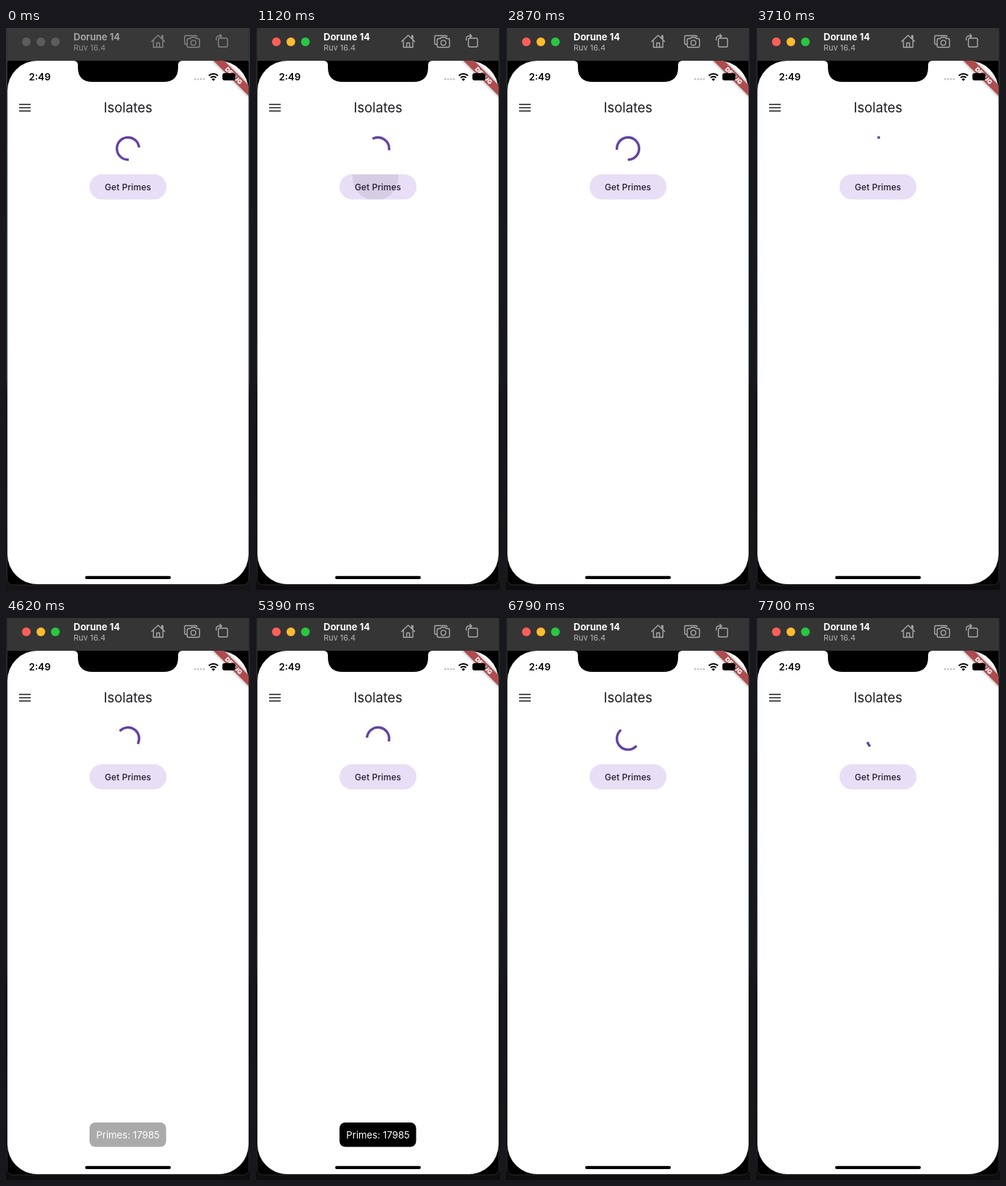
An HTML page for the animation above (7770 ms loop, 336 by 772 pixels).

```html
<!DOCTYPE html>
<html lang="en">
<head>
<meta charset="utf-8">
<title>Isolates</title>
<style>
html, body { margin: 0; width: 100%; height: 100%; overflow: hidden; background: #000; }
svg { display: block; width: 336px; height: 772px; font-family: Inter, Roboto, sans-serif; }
#bar { --bg: #353536; --title: #fff; --sub: #b4b4b4; --icon: #a9a9a9; }
#bar.idle { --bg: #383838; --title: #a3a3a3; --sub: #8f8f8f; --icon: #858585; }
#bar.idle circle { fill: #5c5c5c; }
#icons { fill: none; stroke: var(--icon); stroke-width: 1.4; stroke-linejoin: round; stroke-linecap: round; }
</style>
</head>
<body>
<svg viewBox="0 0 336 772">
  <defs>
    <linearGradient id="desk" x2="0" y2="1">
      <stop offset="0" stop-color="#27343d"/>
      <stop offset=".3" stop-color="#1f3a45"/>
      <stop offset=".62" stop-color="#2b4148"/>
      <stop offset=".66" stop-color="#14171a"/>
      <stop offset=".88" stop-color="#241d1b"/>
      <stop offset="1" stop-color="#151314"/>
    </linearGradient>
    <clipPath id="screen"><rect x="2" y="45" width="332" height="719" rx="41"/></clipPath>
    <clipPath id="pill"><rect x="115" y="201" width="106" height="34.5" rx="17.25"/></clipPath>
    <filter id="blur" x="-20%" y="-80%" width="140%" height="260%"><feGaussianBlur stdDeviation="2"/></filter>
  </defs>

  <rect width="336" height="772" fill="url(#desk)"/>
  <rect id="shade" width="336" height="772" opacity=".35"/>
  <rect x="1.5" y="40" width="333" height="725" rx="8" stroke="#3c3c3c" stroke-width=".7"/>

  <g id="bar">
    <rect x="1.5" width="333" height="45" fill="var(--bg)"/>
    <circle cx="28" cy="19" r="6" fill="#ff5f57"/>
    <circle cx="48" cy="19" r="6" fill="#febc2e"/>
    <circle cx="68" cy="19" r="6" fill="#28c840"/>
    <text x="93" y="17" font-size="13" font-weight="700" fill="var(--title)">Dorune 14</text>
    <text x="93" y="31" font-size="11" fill="var(--sub)">Ruv 16.4</text>
    <g id="icons">
      <path d="M200.500 18.500 209.500 10l9 8.500M203 17v9.500h13V17M207.500 26.500v-6h4v6M214.500 14v-3.500h1.500v5"/>
      <path d="M249 22.500h-1.500a1.500 1.500 0 0 1-1.500-1.500v-9a1.500 1.500 0 0 1 1.500-1.500h14a1.500 1.500 0 0 1 1.500 1.500"/>
      <path d="M251.500 14.500h2.500l1.200-1.700h5.600l1.200 1.700h2.500a2 2 0 0 1 2 2v8a2 2 0 0 1-2 2h-13a2 2 0 0 1-2-2v-8a2 2 0 0 1 2-2z"/>
      <ellipse cx="258" cy="20.300" rx="3.400" ry="3.400"/>
      <rect x="292.500" y="14" width="12.500" height="12" rx="1.800"/>
      <path d="M289.500 16.500v-2a3.500 3.500 0 0 1 3.500-3.500h4M294.500 8.500l2.500 2.500-2.500 2.500"/>
    </g>
  </g>

  <g clip-path="url(#screen)">
    <rect x="2" y="45" width="332" height="719" fill="#fff"/>
    <path d="M93 45q6 0 6 6v3q0 20 20 20h98q20 0 20-20v-3q0-6 6-6z"/>
    <text x="46.500" y="71.500" font-size="13.300" font-weight="600" text-anchor="middle">2:49</text>

    <path d="M18 105h16M18 109.500h16M18 114h16" stroke="#1d1b20" stroke-width="1.700"/>
    <text x="168" y="116.300" font-size="18.500" text-anchor="middle" fill="#1d1b20">Isolates</text>

    <path id="spinner" fill="none" stroke="#6442a0" stroke-width="3.400" stroke-linecap="square"/>

    <g clip-path="url(#pill)">
      <rect x="115" y="201" width="106" height="35" fill="#e8def6"/>
      <circle id="ripple" fill="#1d192b"/>
    </g>
    <text x="168" y="222.500" font-size="11.900" font-weight="500" letter-spacing=".15" text-anchor="middle" fill="#1d192b">Get Primes</text>

    <g id="toast">
      <rect x="115" y="693" width="105.500" height="33.500" rx="8"/>
      <text x="168" y="714.800" font-size="13.200" text-anchor="middle" fill="#fff">Primes: 17985</text>
    </g>
    <rect x="109" y="752.800" width="118" height="4.200" rx="2.100"/>

    <g transform="translate(334 45) rotate(45)">
      <rect x="-48" y="23.800" width="96" height="10.200" opacity=".5" filter="url(#blur)"/>
      <rect x="-48" y="23.800" width="96" height="10.200" fill="#b04a4d"/>
      <text y="32" font-size="8.500" font-weight="900" text-anchor="middle" fill="#fff">DEBUG</text>
    </g>

    <path d="M260.500 70.300h14" stroke="#b5b5b5" stroke-width="2.400" stroke-linecap="round" stroke-dasharray="0 4"/>
    <g fill="none" stroke="#000" stroke-width="2">
      <path d="M279.300 65.500a8.900 8.900 0 0 1 12.600 0M281.800 68.200a5.400 5.400 0 0 1 7.600 0"/>
    </g>
    <path d="M285.600 72.700l-2.300-2.300a3.300 3.300 0 0 1 4.600 0z"/>
    <rect x="298" y="62" width="18" height="10" rx="3"/>
    <path d="M317 65.300q1.500 1.700 0 3.400z"/>
  </g>
</svg>

<script>
const LOOP = 7770, STEP = 70;
const SPEED = 20 / 21;
const TAU = Math.PI * 2;
const el = id => document.getElementById(id);
const clamp = x => Math.min(1, Math.max(0, x));
const ramp = (t, from, length) => clamp((t - from) / length);
const fract = x => x - Math.floor(x);

// cubic-bezier(.4, 0, .2, 1)
function ease(x) {
  let lo = 0, hi = 1, s = .5;
  for (let i = 0; i < 24; i++) {
    s = (lo + hi) / 2;
    const u = 1 - s;
    if (1.2 * u * u * s + .6 * u * s * s + s ** 3 < x) lo = s; else hi = s;
  }
  return s * s * (3 - 2 * s);
}

function drawSpinner(t) {
  const time = (t - 3710) * SPEED + 15;
  const phase = fract(time / 1333), turn = fract(time / 2222);
  const head = ease(clamp(phase * 2)), tail = ease(clamp(phase * 2 - 1));
  const start = TAU * (-.25 + tail * .75 + turn + phase * .25);
  const sweep = Math.max((head - tail) * .75 * TAU, .01);
  const point = a => `${168 + 15.3 * Math.cos(a)} ${165.6 + 15.3 * Math.sin(a)}`;
  el("spinner").setAttribute("d",
    `M${point(start)}A15.3 15.3 0 ${+(sweep > Math.PI)} 1 ${point(start + sweep)}`);
}

function drawRipple(t) {
  const grow = ramp(t, 910, 560), ripple = el("ripple");
  ripple.setAttribute("r", 17 + 39 * grow);
  ripple.setAttribute("cx", 163 + 4 * grow);
  ripple.setAttribute("cy", 203 + 6 * grow);
  ripple.setAttribute("opacity", .085 * ramp(t, 910, 75) * (1 - ramp(t, 1190, 375)));
}

function draw(now) {
  const t = Math.floor(now % LOOP / STEP) * STEP;
  const idle = t < 770;
  el("bar").classList.toggle("idle", idle);
  el("shade").setAttribute("opacity", idle ? 0 : .35);
  drawSpinner(t);
  drawRipple(t);
  el("toast").setAttribute("opacity", ramp(t, 4550, 210) - ramp(t, 6300, 210));
}

const begin = performance.now();
function frame() {
  draw(performance.now() - begin);
  requestAnimationFrame(frame);
}
frame();
</script>
</body>
</html>
```
